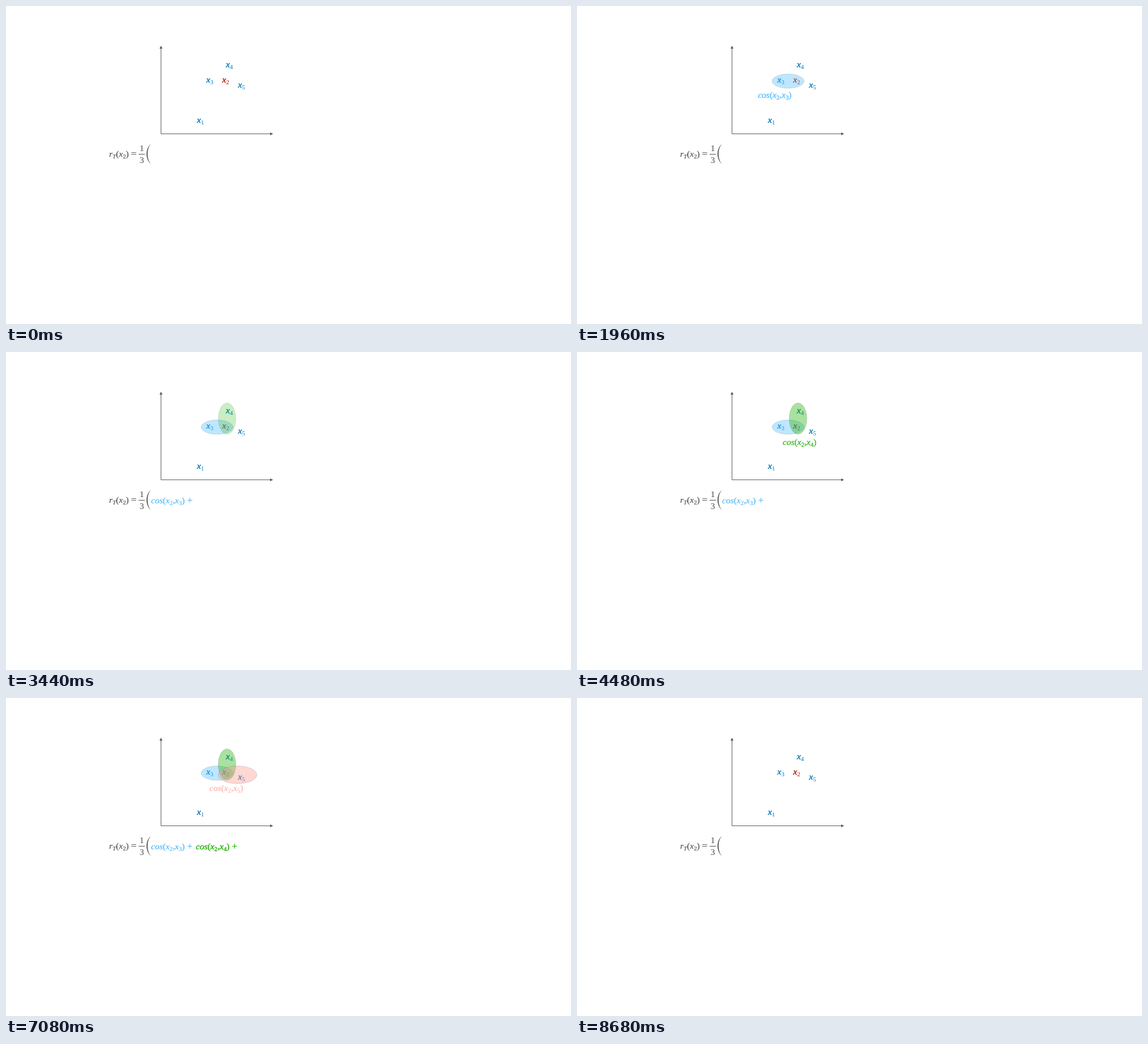
Recreate the animation shown at these times as an HTML page. Size 997x561 px, loop 8.72 s.

```html
<!DOCTYPE html>
<html lang="en">
<head>
<meta charset="utf-8">
<style>
  html, body { margin: 0; width: 100%; height: 100%; overflow: hidden; background: #fff; }
  svg { display: block; width: 997px; height: 561px; }
  text { font: 15.5px "Liberation Serif", "Noto Serif", serif; white-space: pre; }
  .var { font-style: italic; }
  .sub { font-size: 10.85px; }
  .operator { font-size: 17.5px; }
  .bold, .label .var { stroke: currentColor; stroke-width: .4px; }
  .label .sub { stroke: none; }
  .medium { stroke: currentColor; stroke-width: .15px; }
  ellipse { stroke: #4a5a68; stroke-width: .7; stroke-dasharray: 1 1.3; fill-opacity: .38; stroke-opacity: .75; }
</style>
</head>
<body>
<svg id="stage" viewBox="0 0 997 561"></svg>
<script>
const LOOP = 8720, RESET = 8680, GRAY = '#4c4c4c', AXIS = '#5a5a5a';
const ELLIPSE_FADE = 900, TEXT_FADE = 700, MOVE = 1000;

const labels = [
  ['x_1', 337, 206], ['x_3', 353.5, 135], ['x_4', 388, 108], ['x_5', 409.5, 144],
  ['x_2', 381.5, 135, '#b51700']
];

// start and end give the left edge and baseline of each travelling term
const terms = [
  { math: 'cos(x_2,x_3)', tail: ' +', color: '#56c1ff', settled: '#45b4f5', weights: ['bold', 'medium'],
    ellipse: [372.5, 132.5, 28, 12.5], start: [312, 161], end: [256, 266.5], drift: 8,
    shapeAt: 60, textAt: 900, moveAt: 1890 },
  { math: 'cos(x_2,x_4)', tail: ' +', color: '#36bb1b', settled: '#1db100', weights: ['bold', 'bold'],
    ellipse: [390, 117.5, 15.5, 27.5], start: [363, 164], end: [335, 266.5], drift: 0,
    shapeAt: 2890, textAt: 3820, moveAt: 4770 },
  { math: 'cos(x_2,x_5)', tail: '', color: '#ff968d', settled: '#ff968d', weights: ['medium', 'medium'],
    ellipse: [408.5, 135.5, 34, 15.5], start: [359, 164], end: [414, 266.5], drift: 0,
    shapeAt: 5770, textAt: 6520, moveAt: 7700 }
];

// Letters become italic variables; "_c" becomes a subscript.
function mathSpans(source) {
  let lowered = 0;
  return source.replace(/_(.)|([a-z]+)|([+=])|([^a-z_+=]+)/g, (_, sub, word, operator, sign) => {
    const drop = sub ? 3 : 0, dy = drop - lowered;
    lowered = drop;
    const style = [sub && 'sub', (word || sub === 'T') && 'var', operator && 'operator'];
    return `<tspan class="${style.filter(Boolean).join(' ')}" dy="${dy}">${sub || word || operator || sign}</tspan>`;
  });
}

function mathText(source, x, y, color, attrs = '') {
  return `<text x="${x}" y="${y}" fill="${color}" color="${color}" ${attrs}>${mathSpans(source)}</text>`;
}

const stage = document.getElementById('stage');
stage.innerHTML = `
  <path d="M273.5 73V225.5H468" fill="none" stroke="${AXIS}"/>
  <path d="M273.5 70l2.6 5.2h-5.2zM471.3 225.5l-5.2 -2.6v5.2z" fill="${AXIS}"/>
  ${labels.map(([name, x, y, color = '#0076ba']) => mathText(name, x, y, color, 'class="label"')).join('')}
  ${mathText('r_T(x_2) =', 182, 266, GRAY, 'class="medium"')}
  <text x="239.5" y="256" text-anchor="middle" fill="${GRAY}">1</text>
  <text x="239.5" y="277" text-anchor="middle" fill="${GRAY}">3</text>
  <path d="M234 261.5h11" stroke="${GRAY}"/>
  <path d="M256 243C245.3 252 245.3 270 256 279.5C247.7 270 247.7 252 256 243z" fill="${GRAY}"/>
  ${terms.map((term, i) => {
    const [cx, cy, rx, ry] = term.ellipse;
    return `<ellipse id="shape${i}" cx="${cx}" cy="${cy}" rx="${rx}" ry="${ry}" fill="${i === 1 ? term.settled : term.color}"/>`;
  }).join('')}
  ${terms.map((term, i) =>
    mathText(term.math, 0, 0, term.color, `id="mover${i}" class="${term.weights[0]}"`) +
    mathText(term.math + term.tail, ...term.end, term.settled, `id="settled${i}" class="${term.weights[1]}"`)
  ).join('')}`;

const clamp = v => Math.max(0, Math.min(1, v));
const progress = (time, start, duration) => clamp((time - start) / duration);
const ease = u => (1 - Math.cos(Math.PI * u)) / 2;
const mix = (a, b, p) => a + (b - a) * p;
const part = (name, i) => document.getElementById(name + i);

function draw(now) {
  const elapsed = now % LOOP;
  const time = elapsed >= RESET ? 0 : elapsed;
  terms.forEach((term, i) => {
    const move = progress(time, term.moveAt, MOVE);
    const p = ease(move);
    const arrived = move === 1;
    const left = term.start[0] + term.drift * ease(progress(time, 1240, 640));
    const x = mix(left, term.end[0], p);
    const y = mix(term.start[1], term.end[1], p);
    const mover = part('mover', i);
    mover.setAttribute('transform', `translate(${x} ${y})`);
    mover.setAttribute('opacity', arrived ? 0 : progress(time, term.textAt, TEXT_FADE));
    part('settled', i).setAttribute('opacity', arrived ? 1 : 0);
    part('shape', i).setAttribute('opacity', progress(time, term.shapeAt, ELLIPSE_FADE));
  });
}

const began = performance.now();
function tick() {
  draw(performance.now() - began);
  requestAnimationFrame(tick);
}
tick();
</script>
</body>
</html>
```
